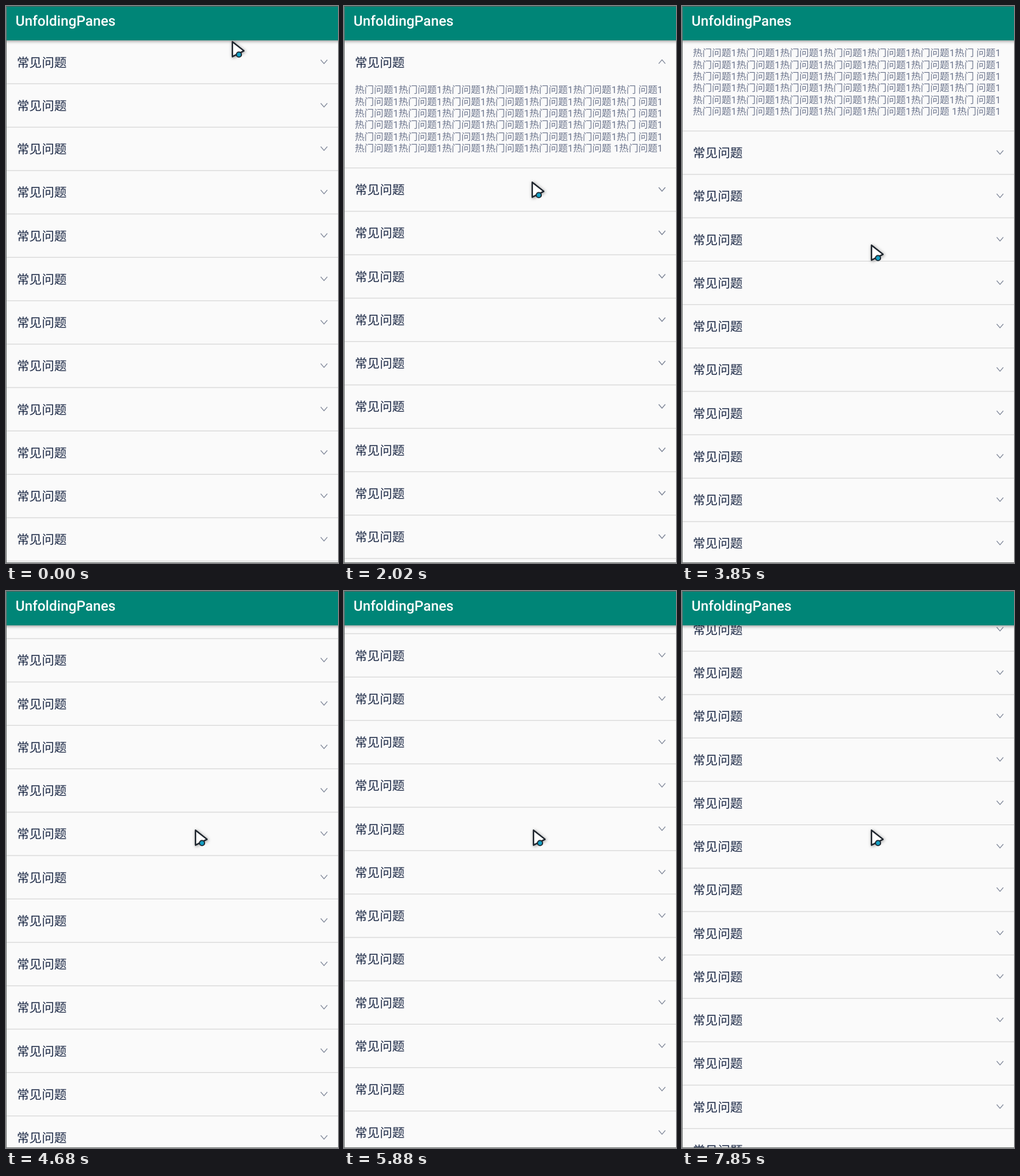
These frames come from a looping animation (522 px wide and 876 px high, 8000 ms). An HTML page with a canvas:

```html
<!DOCTYPE html>
<html lang="zh">
<head>
<meta charset="utf-8">
<title>Accordion list</title>
<style>
  html, body { margin: 0; width: 100%; height: 100%; overflow: hidden; background: #fafafa; }
  canvas { display: block; }
</style>
</head>
<body>
<canvas id="stage" width="522" height="876"></canvas>
<script>
const ctx = document.getElementById('stage').getContext('2d');
const WIDTH = 522, HEIGHT = 876, LOOP = 8000;
const STEP = 130; // moving parts advance in visible steps of this many ms
const LIST_TOP = 54, ROW_HEIGHT = 68.25, BODY_HEIGHT = 132.4, ROW_COUNT = 40;
const FONTS = 'Roboto, "Noto Sans CJK SC", "Noto Sans CJK", sans-serif';

const PHRASE = '热门问题1';
const BODY_LINES = [
  ...Array(5).fill(PHRASE.repeat(6) + '热门 问题1'),
  PHRASE.repeat(5) + '热门问题 1' + PHRASE
];

const CURSOR_START = { x: 355, y: 55 };
const CURSOR_MOVES = [
  { start: 280, steps: 2, x: 369.5, y: 82 },
  { start: 1620, steps: 4, x: 295, y: 276 },
  { start: 3280, steps: 2, x: 297, y: 375 }
];
const OPENINGS = [{ start: 1080, steps: 4 }, { start: 2730, steps: 3 }];
const SWIPES = [
  { start: 3580, steps: 4, distance: 345 },
  { start: 4530, steps: 4, distance: 344 },
  { start: 5180, steps: 1, distance: 88 },
  { start: 5880, steps: 3, distance: 267 },
  { start: 6400, steps: 2, distance: 138.4 },
  { start: 7580, steps: 3, distance: 270.3 }
];

function progress(time, { start, steps }) {
  const done = Math.floor((time - start) / STEP) + 1;
  return Math.min(Math.max(done / steps, 0), 1);
}

const easeOut = p => 1 - (1 - p) ** 2;

function scrollAt(time) {
  return SWIPES.reduce((sum, swipe) => sum + swipe.distance * progress(time, swipe), 0);
}

function cursorAt(time) {
  return CURSOR_MOVES.reduce((from, move) => {
    const p = easeOut(progress(time, move));
    return { x: from.x + (move.x - from.x) * p, y: from.y + (move.y - from.y) * p };
  }, CURSOR_START);
}

function drawText(text, x, baseline, size, color, weight = 400) {
  ctx.font = `${weight} ${size}px ${FONTS}`;
  ctx.textRendering = 'geometricPrecision';
  ctx.fillStyle = color;
  ctx.fillText(text, x, baseline);
}

function drawChevron(y, open) {
  ctx.save();
  ctx.translate(500, y);
  ctx.rotate(open * Math.PI);
  ctx.strokeStyle = '#7b8395';
  ctx.lineWidth = 1.2;
  ctx.beginPath();
  ctx.moveTo(-5.2, -3);
  ctx.lineTo(0, 3);
  ctx.lineTo(5.2, -3);
  ctx.stroke();
  ctx.restore();
}

function drawBody(top, height) {
  ctx.save();
  ctx.beginPath();
  ctx.rect(0, top, WIDTH, height);
  ctx.clip();
  BODY_LINES.forEach((line, i) =>
    drawText(line, 17, top + 15 + i * 18.4, 15.06, '#6c758d'));
  ctx.restore();
}

function drawRows(time) {
  let top = LIST_TOP - scrollAt(time);
  for (let i = 0; i < ROW_COUNT; i++) {
    const open = OPENINGS[i] ? easeOut(progress(time, OPENINGS[i])) : 0;
    const bodyHeight = open * BODY_HEIGHT;
    const bottom = top + ROW_HEIGHT + bodyHeight;
    if (bottom > 40 && top < HEIGHT) {
      drawText('常见问题', 17, top + 41.5, 19.6, '#1a2744');
      drawChevron(top + 33.6, open);
      if (open) drawBody(top + ROW_HEIGHT, bodyHeight);
      ctx.fillStyle = '#d9d9d9';
      ctx.fillRect(0, bottom - .6, WIDTH, 1.3);
    }
    top = bottom;
  }
}

function drawHeader() {
  ctx.save();
  ctx.shadowColor = 'rgba(0, 0, 0, .42)';
  ctx.shadowBlur = 5;
  ctx.shadowOffsetY = 1.5;
  ctx.fillStyle = '#008577';
  ctx.fillRect(-10, -10, WIDTH + 20, LIST_TOP + 10);
  ctx.restore();
  drawText('UnfoldingPanes', 15, 31, 22.1, '#fff', 500);
}

function drawFrameEdges() {
  ctx.fillStyle = '#6f7473';
  ctx.fillRect(0, 0, 1, HEIGHT);
  ctx.fillRect(0, HEIGHT - 1, WIDTH, 1);
  ctx.fillStyle = '#505f5c';
  ctx.fillRect(0, 0, WIDTH, 1);
}

function drawCursor({ x, y }) {
  ctx.save();
  ctx.translate(x, y);
  ctx.shadowColor = 'rgba(0, 0, 0, .55)';
  ctx.shadowBlur = 5;
  ctx.shadowOffsetX = ctx.shadowOffsetY = 1;
  ctx.lineJoin = 'round';
  ctx.lineWidth = 2.2;
  ctx.strokeStyle = '#20272f';
  ctx.beginPath();
  ctx.moveTo(1, 1.3);
  ctx.lineTo(1, 24.6);
  ctx.lineTo(8, 21);
  ctx.lineTo(19, 15.5);
  ctx.closePath();
  ctx.stroke();
  ctx.shadowColor = 'transparent';
  ctx.fillStyle = '#fff';
  ctx.fill();
  ctx.stroke();
  ctx.fillStyle = '#129fc4';
  ctx.lineWidth = 1.8;
  ctx.beginPath();
  ctx.arc(11.2, 21.4, 4, 0, 2 * Math.PI);
  ctx.fill();
  ctx.stroke();
  ctx.restore();
}

const loopStart = performance.now();
function render() {
  const time = (performance.now() - loopStart) % LOOP;
  ctx.fillStyle = '#fafafa';
  ctx.fillRect(0, 0, WIDTH, HEIGHT);
  drawRows(time);
  drawHeader();
  drawFrameEdges();
  drawCursor(cursorAt(time));
  requestAnimationFrame(render);
}
render();
</script>
</body>
</html>
```
